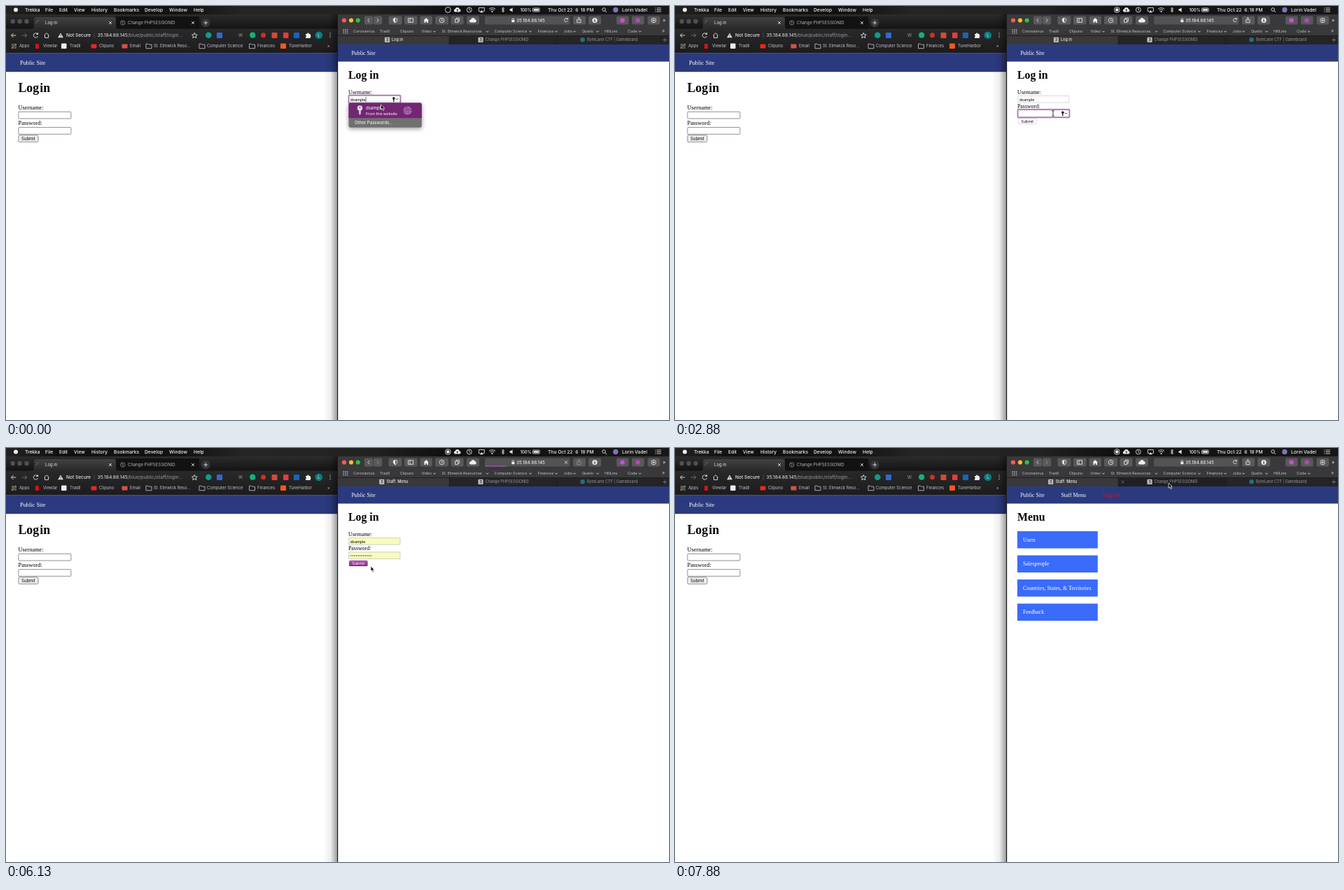
Animation of 947 by 592 pixels, one loop 8000 ms. Source, as an HTML page:

```html
<!DOCTYPE html>
<html lang="en">
<head>
<meta charset="utf-8">
<title>Log in</title>
<style>
html, body { margin: 0; width: 100%; height: 100%; overflow: hidden; background: #fff; }
svg { display: block; width: 100vw; height: 100vh; }
text { font-family: Inter, Roboto, sans-serif; fill: #e8e8e8; }
.menu text { font-size: 6.7px; fill: #f4f4f4; font-weight: 500; }
.tabs text { font-size: 6px; }
.url text { font-size: 6.8px; }
.marks text { font-size: 5.9px; fill: #c4c5c8; }
.favs text { font-size: 5.35px; fill: #c6c6c8; }
.pages text { font-size: 5.5px; fill: #98989a; }
.pages .active { fill: #f2f2f2; font-weight: 500; }
.left text, .right text { font-family: "Liberation Serif", "Noto Serif", serif; fill: #000; }
.left text { font-size: 8.35px; }
.right text { font-size: 7.85px; }
.left .title { font-size: 17.8px; font-weight: bold; word-spacing: -.19em; }
.right .title { font-size: 15.8px; font-weight: bold; }
text.ui { font: 5.4px Inter, Roboto, sans-serif; }
.left .ui { font-size: 6px; }
text.light { fill: #fff; }
.right .danger { fill: #dc101c; }
.bold { font-weight: 700; }
.line { fill: none; stroke: #e4e4e4; stroke-width: .9; }
.dim { opacity: .4; }
</style>
</head>
<body>
<svg viewBox="0 0 947 592" preserveAspectRatio="none">
  <defs>
    <linearGradient id="shade">
      <stop offset="0" stop-opacity="0"/><stop offset=".5" stop-opacity=".07"/><stop offset="1" stop-opacity=".42"/>
    </linearGradient>
    <linearGradient id="bar">
      <stop stop-color="#222"/><stop offset=".08" stop-color="#111"/><stop offset=".27" stop-color="#121213"/>
      <stop offset=".36" stop-color="#252526"/><stop offset=".55" stop-color="#222"/><stop offset=".66" stop-color="#101011"/>
      <stop offset="1" stop-color="#171718"/>
    </linearGradient>
    <linearGradient id="strip" x2="0" y2="1"><stop stop-color="#2c2c2d"/><stop offset="1" stop-color="#131314"/></linearGradient>
    <linearGradient id="tab" x2="0" y2="1"><stop stop-color="#424243"/><stop offset="1" stop-color="#29292a"/></linearGradient>
    <linearGradient id="tools" x2="0" y2="1"><stop stop-color="#29292a"/><stop offset="1" stop-color="#1c1c1e"/></linearGradient>
    <linearGradient id="pressed" x2="0" y2="1"><stop stop-color="#b55bb6"/><stop offset="1" stop-color="#86268a"/></linearGradient>
    <filter id="drop" x="-20%" y="-30%" width="140%" height="180%">
      <feDropShadow dx="0" dy="2" stdDeviation="3" flood-opacity=".4"/>
    </filter>
    <path id="chevron" class="line" d="M-1.6-.8L0 .8 1.6-.8"/>
    <path id="cross" class="line" d="M-2-2L2 2M2-2L-2 2"/>
    <path id="folder" d="M0 1h3l1 1h4v5.5H0z" fill="none" stroke="#a9abae"/>
    <path id="share" class="line" d="M817.3 19.3h-1.7v4.4h5.4v-4.4h-1.7m-1 2v-4.8m-1.4 1.4l1.4-1.4 1.4 1.4"/>
    <path id="forward" class="line" d="M529.8 18l2.5 2.500-2.5 2.5"/>
    <g id="grid"></g>
    <g id="key"><circle r="1.7"/><path d="M-.6 1H.6V4.600L0 5.200-.6 4.600z"/></g>
    <g id="focus">
      <rect x="489.5" y="127.6" width="74" height="11.4" rx="1" fill="none" stroke="#b46fb8" stroke-width="1.7"/>
      <use href="#key" x="553.8" y="132"/>
      <path d="M556.9 132.4l1.6 1.6 1.6-1.6" fill="none" stroke="#111" stroke-width=".9"/>
    </g>
    <g id="popup">
      <g filter="url(#drop)">
        <rect x="489.5" y="138.5" width="104.3" height="35.3" rx="2.5" fill="#707070"/>
        <path d="M489.5 160.3V141a2.5 2.5 0 0 1 2.5-2.5h99.3a2.5 2.5 0 0 1 2.5 2.5v19.3z" fill="#732873"/>
      </g>
      <g fill="#e6dfe8"><circle cx="505.5" cy="146" r="3.7"/><path d="M504.3 149h2.4v5l-1.2 2-1.2-2z"/></g>
      <circle cx="505.5" cy="145" r=".9" fill="#732873"/>
      <g fill="none" stroke="#d9a9dc" stroke-width=".8">
        <circle cx="573.5" cy="149.5" r="5.4" stroke-dasharray="7 1.2"/>
        <path d="M569.8 152v-2.6a3.7 3.7 0 0 1 7.4 0v3.5M571.7 154v-4.5a1.9 1.9 0 0 1 3.7 0v4.8M573.5 149.5v5.3"/>
      </g>
      <text class="ui light" x="514" y="148.4" style="font-size:6.2px">dsample</text>
      <text class="ui light" x="514" y="156.4">From this website</text>
      <text class="ui light" x="498" y="169.2" style="font-size:6.1px">Other Passwords...</text>
    </g>
    <g id="badge"><rect x="-3.6" y="-3.6" width="7.2" height="7.2" rx="1" fill="#bdbdbf"/><path d="M-1.2-1.8H1.2L0-.3Q1.5-.2 1.3 1T-1.3 1.5" fill="none" stroke="#333" stroke-width=".8"/></g>
  </defs>

  <rect width="947" height="592" fill="#fff"/>
  <rect width="947" height="12" fill="url(#bar)"/>

  <g class="menu">
    <circle cx="14" cy="5.5" r="3" fill="#eee"/>
    <text class="bold" x="27" y="8">Trekka</text>
    <text x="56" y="8">File</text><text x="76" y="8">Edit</text><text x="97" y="8">View</text>
    <text x="122" y="8">History</text><text x="154" y="8">Bookmarks</text><text x="198" y="8">Develop</text>
    <text x="233" y="8">Window</text><text x="268" y="8">Help</text>
    <circle class="line" cx="631.3" cy="5.5" r="3.9"/>
    <circle data-on="1750-8000" cx="631.3" cy="5.5" r="2.3" fill="#eee"/>
    <path d="M641.5 8.5a2.2 2.2 0 0 1 .2-4.3 3.2 3.2 0 0 1 6 0 2.2 2.2 0 0 1 .2 4.3z" fill="#eee"/>
    <path d="M644.7 8V4.8m-1.4 1.3l1.4-1.4 1.4 1.4" fill="none" stroke="#111" stroke-width=".8"/>
    <circle class="line" cx="661.8" cy="5.5" r="3.5"/><path class="line" d="M661.8 3.2v2.5l1.6.9"/>
    <path class="line" d="M677 7.5h-1.7v-5h8v5h-1.6"/><path d="M679.3 6l2.7 3.3h-5.4z" fill="#eee"/>
    <path class="line" d="M690 4.3a7 7 0 0 1 9 0M691.6 6a4.600 4.600 0 0 1 5.8 0"/><circle cx="694.5" cy="8" r="1.1" fill="#eee"/>
    <path class="line" d="M708 3.6l3.6 3.6-1.8 1.8V2l1.8 1.8-3.6 3.6"/>
    <path d="M719.5 4.2h1.7l2.3-2v6.6l-2.3-2h-1.7z" fill="#eee"/>
    <text x="734.5" y="8" style="font-size:6px">100%</text>
    <rect class="line" x="752.5" y="3" width="9.6" height="5" rx="1"/><rect x="753.7" y="4.2" width="7.2" height="2.6" fill="#eee"/>
    <text x="774" y="8">Thu Oct 22</text><text x="813.2" y="8">6</text>
    <text data-on="750-1750 2750-3750 4750-5750 6750-7750" x="818" y="7.6">:</text><text x="820.5" y="8">18 PM</text>
    <circle class="line" cx="854" cy="5" r="2.3"/><path class="line" d="M855.7 6.8l2.2 2.2"/>
    <circle cx="870.8" cy="5.5" r="3.7" fill="#7b77b5"/>
    <text x="880" y="8">Lorin Vadel</text>
    <path class="line" d="M927 3h1m1.3 0h6.5M927 5.5h1m1.3 0h6.5M927 8h1m1.3 0h6.5"/>
  </g>

  <!-- left browser -->
  <rect y="12" width="474" height="21" fill="url(#strip)"/>
  <rect y="32.5" width="474" height="34.8" fill="url(#tools)"/>
  <rect x="157" y="15" width="119" height="17.5" fill="#121213"/>
  <path d="M36 33q4 0 4-4V20q0-4 4-4H153q4 0 4 4v9q0 4 4 4z" fill="url(#tab)"/>
  <g fill="#505154"><circle cx="9.7" cy="22" r="3.2"/><circle cx="19.6" cy="22" r="3.2"/><circle cx="29.5" cy="22" r="3.2"/></g>
  <g class="tabs">
    <path class="line" d="M43.5 25a3.3 3.3 0 0 1 3.3-4.3" style="stroke:#777"/>
    <text x="56" y="26.2">Log in</text><use href="#cross" x="149" y="24"/>
    <circle cx="166.8" cy="24" r="3.2" fill="none" stroke="#77797c"/><path d="M164.5 22l3 1.2-1 3" fill="none" stroke="#77797c"/>
    <text x="174" y="26.2" style="fill:#b4b5b8">Change PHPSESSIONID</text><use href="#cross" x="267" y="24"/>
    <circle cx="285.3" cy="24" r="6.3" fill="#35363a"/><path class="line" d="M282.5 24h5.6m-2.8-2.8v5.6"/>
  </g>
  <g class="url">
    <g class="line">
      <path d="M14.2 42H7.5m3-3l-3 3 3 3"/><path d="M23 42h6.7m-3-3l3 3-3 3" class="dim"/>
      <path d="M45 40a3.2 3.2 0 1 0 .5 3M45.5 38v2.5H43"/><path d="M54.5 42l3.5-3.3 3.5 3.3m-6-.5v4h5v-4"/>
    </g>
    <path d="M78 38.5l3.9 6.7h-7.8z" fill="#ddd"/><path d="M78 40.8v2m0 .7v.8" stroke="#222" stroke-width=".8"/>
    <text x="86" y="44.2" style="font-weight:500;font-size:6.6px">Not Secure</text><path d="M126 38v8" stroke="#55565a" stroke-width=".7"/>
    <text x="130.5" y="44.2">35.184.88.145<tspan fill="#97999d">/blue/public/staff/login...</tspan></text>
    <path class="line" d="M269.3 38.3l1.1 2.6 2.8.2-2.1 1.9.7 2.7-2.5-1.5-2.5 1.5.7-2.7-2.1-1.9 2.8-.2z"/>
    <circle cx="289.3" cy="41.7" r="4.3" fill="#12998b"/>
    <rect x="301" y="38" width="8" height="8" rx="1" fill="#2f69d2"/>
    <text x="332" y="44" style="font-size:6px;fill:#9b9da0">W.</text>
    <circle cx="352.2" cy="41.7" r="4.1" fill="#14b274"/>
    <circle cx="367.5" cy="41.7" r="3.5" fill="#c93324"/>
    <rect x="379.5" y="38" width="8" height="8" rx="1" fill="#d64a31"/>
    <rect x="396" y="38" width="7.5" height="8" rx="1" fill="#e93a39"/>
    <rect x="411" y="38" width="8" height="8" rx="1" fill="#1764bd"/>
    <path d="M428 40h2a1.4 1.4 0 0 1 2.8 0h2v2a1.4 1.4 0 0 1 0 2.5v1.5H428v-2a1.3 1.3 0 0 0 0-2.500z" fill="#eee"/>
    <circle cx="446.8" cy="41.7" r="5.3" fill="#087f83"/><text x="445.2" y="43.9" style="font-size:6px">L</text>
    <path d="M463 39v6" stroke="#ccc" stroke-width="1.5" stroke-linecap="round" stroke-dasharray="0 2.8"/>
  </g>
  <g class="marks">
    <use href="#grid" x="8" y="54"/>
    <text x="19" y="59.4">Apps</text>
    <rect x="42" y="54" width="5" height="7" fill="#cf141b"/><text x="53" y="59.4">Viewlar</text>
    <rect x="79" y="53.5" width="7.5" height="7.5" rx="1" fill="#eee"/><text x="91" y="59.4">Tradil</text>
    <rect x="121.5" y="54.5" width="8" height="6" rx="1.5" fill="#ef2420"/><text x="133" y="59.4">Clipuno</text>
    <rect x="165.5" y="54.5" width="8" height="6" rx=".7" fill="#d75045"/><text x="177" y="59.4">Email</text>
    <use href="#folder" x="200" y="53.2"/><text x="211" y="59.4">St. Elmwick Reso...</text>
    <use href="#folder" x="276" y="53.2"/><text x="287" y="59.4">Computer Science</text>
    <use href="#folder" x="347.5" y="53.2"/><text x="359" y="59.4">Finances</text>
    <rect x="392" y="53.5" width="8" height="7.5" rx="1" fill="#f2591f"/><text x="404" y="59.4">TuneHarbor</text>
    <text x="459" y="59.4">»</text>
  </g>
  <rect y="67.2" width="474" height="27" fill="#2b3a7f"/>
  <g class="left">
    <text class="light" x="20" y="84.2">Public Site</text>
    <text class="title" x="17.5" y="122.5">Log in</text>
    <text x="17.5" y="147.5">Username:</text><text x="17.5" y="169.8">Password:</text>
    <g fill="#fff" stroke="#85858a" stroke-width=".9">
      <rect x="17.9" y="151.3" width="75" height="9.7" rx=".8"/><rect x="17.9" y="173.6" width="75" height="9.7" rx=".8"/>
      <rect x="17.9" y="184.8" width="28" height="9.6" rx="1.2" fill="#efefef"/>
    </g>
    <text class="ui" x="22" y="191.8">Submit</text>
  </g>
  <rect x="453" y="12" width="21" height="580" fill="url(#shade)"/>

  <!-- right browser -->
  <rect x="473" y="11.5" width="1.2" height="580.5" fill="#18181a"/>
  <rect x="474" y="12" width="473" height="43" fill="#39393b"/>
  <circle cx="483" cy="20.5" r="3.1" fill="#fc5b57"/><circle cx="493" cy="20.5" r="3.1" fill="#fdbd2e"/><circle cx="502.7" cy="20.5" r="3.1" fill="#29c840"/>
  <g id="buttons" fill="#59595b"></g>
  <path class="line" d="M519.2 18l-2.5 2.5 2.5 2.5"/>
  <use data-on="0-5500" href="#forward"/>
  <use data-on="5500-8000" href="#forward" class="dim"/>
  <path class="line" d="M556 17.3l2.7 1v2q0 2.3-2.7 3.7-2.7-1.4-2.7-3.7v-2z"/><path d="M556 17v7q-2.7-1.4-2.7-3.7v-2z" fill="#eee"/>
  <path class="line" d="M574.5 17.7h7v5.6h-7zm2.5 0v5.6"/>
  <path d="M596.5 20.6l3.7-3.5 3.7 3.5h-1v3.4h-1.9v-2h-1.6v2h-1.9v-3.4z" fill="#eee"/>
  <circle class="line" cx="622.5" cy="20.5" r="3.3"/><path class="line" d="M622.5 18.5v2.3h1.6"/>
  <path class="line" d="M641.5 19h4.2v4.4h-4.2zm1.6 0v-1.7h4.3v4.4h-1.7"/>
  <path d="M663.7 23.4a2 2 0 0 1 .3-4 3 3 0 0 1 5.8-.3 2.2 2.2 0 0 1 .4 4.3z" fill="#eee"/>
  <rect x="684" y="14.6" width="121.5" height="11.8" rx="2.5" fill="#535355"/>
  <path d="M722.3 20h4v3.2h-4z" fill="#eee"/><path class="line" d="M723 20v-1a1.3 1.3 0 0 1 2.6 0v1"/>
  <text x="729" y="22.8" style="font-size:6.3px;font-weight:500">35.184.88.145</text>
  <g data-on="0-5500 6500-8000">
    <path class="line" d="M802 18.6a2.5 2.5 0 1 0 .3 2.5M802.3 17v2h-2"/>
    <use href="#share"/>
  </g>
  <g data-on="5500-6500">
    <use href="#cross" x="800" y="20.5"/>
    <use href="#share" class="dim"/>
    <rect id="progress" x="684.5" y="25.3" height="1.2" fill="#b14fb5"/>
  </g>
  <circle cx="841" cy="20.5" r="3.6" fill="#eee"/><path d="M841 18.3v4m-1.5-1.5l1.5 1.5 1.5-1.5" fill="none" stroke="#444"/>
  <circle cx="880.5" cy="20.5" r="3.3" fill="#c651cf"/><circle cx="902.5" cy="20.5" r="3.3" fill="#b149b9"/>
  <circle class="line" cx="925" cy="20.5" r="3.3"/><path class="line" d="M923 20.5h4m-2-2v4"/>
  <text x="938" y="22.7" style="font-size:7px">»</text>

  <g class="favs">
    <path d="M481.5 34h7m-7 2.3h7m-7 2.3h7" stroke="#b8b8ba" stroke-width="1.3" stroke-dasharray="1.5 1.2"/>
    <text x="496" y="38.2">Coronavirus</text><text x="534" y="38.2">Tradil</text><text x="563" y="38.2">Clipuno</text>
    <text x="593.5" y="38.2">Video</text><text x="622.5" y="38.2">St. Elmwick Resources</text>
    <text x="697.5" y="38.2">Computer Science</text><text x="759.5" y="38.2">Finances</text><text x="796.5" y="38.2">Jobs</text>
    <text x="823" y="38.2">Quelio</text><text x="855" y="38.2">HillLine</text><text x="888" y="38.2">Code</text>
    <text x="937" y="38.4" style="font-size:7px">»</text><g id="chevrons"></g>
  </g>
  <g class="pages">
    <rect x="633" y="42.5" width="314" height="12.5" fill="#252527"/>
    <path d="M474 42.5H947M633.3 42.5V55M787 42.5V55M936 42.5V55" stroke="#1a1a1b" stroke-width=".8"/>
    <g data-on="0-5750"><use href="#badge" x="544.5" y="48.3"/><text class="active" x="551" y="50.3">Log in</text></g>
    <g data-on="5750-8000"><use href="#badge" x="536.7" y="48.3"/><text class="active" x="543.5" y="50.3">Staff: Menu</text></g>
    <g data-on="7625-8000"><rect x="633.7" y="43" width="153" height="12" fill="#202022"/><use href="#cross" class="dim" x="639.5" y="48.5"/></g>
    <use href="#badge" x="678" y="48.3"/><text x="684.5" y="50.3">Change PHPSESSIONID</text>
    <circle cx="823.5" cy="48.3" r="3.3" fill="#286d79"/><text x="830" y="50.3">ByteLane CTF | Gameboard</text>
    <path class="line dim" d="M938 48.5h6m-3-3v6"/>
  </g>

  <rect x="474" y="55" width="473" height="24.5" fill="#2b3a7f"/>
  <g class="right">
    <text class="light" x="493.5" y="70.2">Public Site</text>
    <g data-on="0-6500">
      <text class="title" x="489" y="104.4">Log in</text>
      <text x="489" y="125.8">Username:</text><text x="489" y="146.2">Password:</text>
      <g fill="#fff" stroke="#c9c9cb" stroke-width=".7">
        <rect x="489.9" y="128.7" width="73" height="9.3"/><rect x="489.9" y="149" width="73" height="9.3"/>
        <g data-on="3000-6500" fill="#f9fbba"><rect x="489.9" y="128.7" width="73" height="9.3"/><rect x="489.9" y="149" width="73" height="9.3"/></g>
        <rect x="490.2" y="161" width="26.2" height="7.7" rx="1.5"/>
      </g>
      <text class="ui" x="491.8" y="135.7">dsample</text>
      <text class="ui" x="494.2" y="167">Submit</text>
      <g data-on="5375-6500">
        <rect x="490" y="160.8" width="26.6" height="8.1" rx="1.5" fill="url(#pressed)"/>
        <text class="ui light" x="494.2" y="167">Submit</text>
      </g>
      <rect data-on="3000-5375" x="491.3" y="150.2" width="30.8" height="7.2" fill="#d9c6ad"/>
      <path data-on="3000-6500" d="M492.7 154h29" stroke="#222" stroke-width="1.4" stroke-linecap="round" stroke-dasharray="0 2.6"/>
      <g data-on="0-500">
        <use href="#focus"/><path d="M514 130v7" stroke="#222" stroke-width=".7"/><use href="#popup"/>
      </g>
      <use data-on="1375-5375" href="#focus" y="20.3"/>
      <path data-on="1375-1875 2375-2750" d="M491.7 150.2v7" stroke="#222" stroke-width=".8"/>
      <use data-on="1375-2875" href="#popup" y="20.3"/>
    </g>
    <g data-on="6500-8000">
      <text class="light" x="551.5" y="70.2">Staff Menu</text><text class="danger" x="611.5" y="70.2">Log out</text>
      <text class="title" x="489" y="104.4">Menu</text>
      <g id="links"></g>
    </g>
    <g data-on="6750-7375">
      <rect x="475" y="580.3" width="177.5" height="10.6" rx="2" fill="#777779"/>
      <text class="ui light" x="477.8" y="587.7" style="font-size:5.7px"><tspan font-weight="600">https://35.184.88.145</tspan>/blue/public/staff/salespeople/index.php</text>
    </g>
  </g>

  <g id="cursor">
    <path data-on="0-375 4625-8000" d="M0 0V7.2L1.7 5.7 2.9 8.5 4.3 7.9 3.1 5.2H5.3z" fill="#111" stroke="#fff" stroke-width=".7"/>
    <path data-on="375-4625" d="M-1.6-4Q0-4 0-3 0-4 1.6-4M0-3V3M-1.6 4Q0 4 0 3 0 4 1.6 4" fill="none" stroke="#111" stroke-width=".9"/>
  </g>
</svg>
<script>
const LOOP = 8000, STEP = 125;
const byId = id => document.getElementById(id);

byId('grid').innerHTML = [...Array(9).keys()].map(i =>
  `<rect x="${i % 3 * 2.5}" y="${(i / 3 | 0) * 2.5}" width="1.7" height="1.7" fill="${['#d35a4d', '#58a66b', '#b9babd'][(i + (i / 3 | 0)) % 3]}"/>`).join('');
byId('buttons').innerHTML = [[512, 12.2], [525, 12.2], [546.5, 19], [569, 18.5], [591.5, 17.5], [613, 19], [635.5, 18],
  [658, 18], [810, 18], [832, 18], [872, 17.5], [894, 17.5], [916.5, 17.5]]
  .map(([x, w]) => `<rect x="${x}" y="14.6" width="${w}" height="11.8" rx="2"/>`).join('');
byId('chevrons').innerHTML = [612, 687.5, 749, 786, 812, 845, 905.5]
  .map(x => `<use href="#chevron" x="${x}" y="36.5"/>`).join('');
byId('links').innerHTML = ['Users', 'Salespeople', 'Countries, States, &amp; Territories', 'Feedback'].map((name, i) => {
  const y = 119 + i * 34.5;
  return `<rect x="489" y="${y}" width="114.8" height="24.5" fill="#3b6bfb"/><text class="light" x="497" y="${y + 14.8}">${name}</text>`;
}).join('');

// Pointer positions: time, x, y
const route = [
  [0, 535.5, 141], [125, 544, 160], [375, 583, 211], [500, 585, 209], [750, 584, 193.5], [875, 579, 187],
  [1375, 540, 153.5], [4500, 540, 153.5], [4625, 534, 156], [5125, 509, 164], [5375, 509, 164],
  [5875, 521, 169], [6500, 521, 169], [6750, 580, 165], [7000, 681, 150], [7125, 695.5, 147],
  [7250, 701, 125], [7375, 703, 101], [7625, 705, 60], [7875, 705, 50]
];
const timed = [...document.querySelectorAll('[data-on]')].map(node => ({
  node, spans: node.dataset.on.split(' ').map(span => span.split('-').map(Number))
}));

function pointAt(t) {
  const i = route.findIndex(p => p[0] > t);
  if (i < 0) return route[route.length - 1].slice(1);
  const a = route[i - 1], b = route[i], k = (t - a[0]) / (b[0] - a[0]);
  return [a[1] + (b[1] - a[1]) * k, a[2] + (b[2] - a[2]) * k];
}

function draw(now) {
  const t = Math.floor(now % LOOP / STEP) * STEP;
  for (const { node, spans } of timed)
    node.style.display = spans.some(([from, to]) => t >= from && t < to) ? '' : 'none';
  byId('cursor').setAttribute('transform', `translate(${pointAt(t)})`);
  byId('progress').setAttribute('width', Math.min(30, Math.max(0, (t - 5375) * .08)));
}

const start = performance.now();
function tick() {
  draw(performance.now() - start);
  requestAnimationFrame(tick);
}
tick();
</script>
</body>
</html>
```
